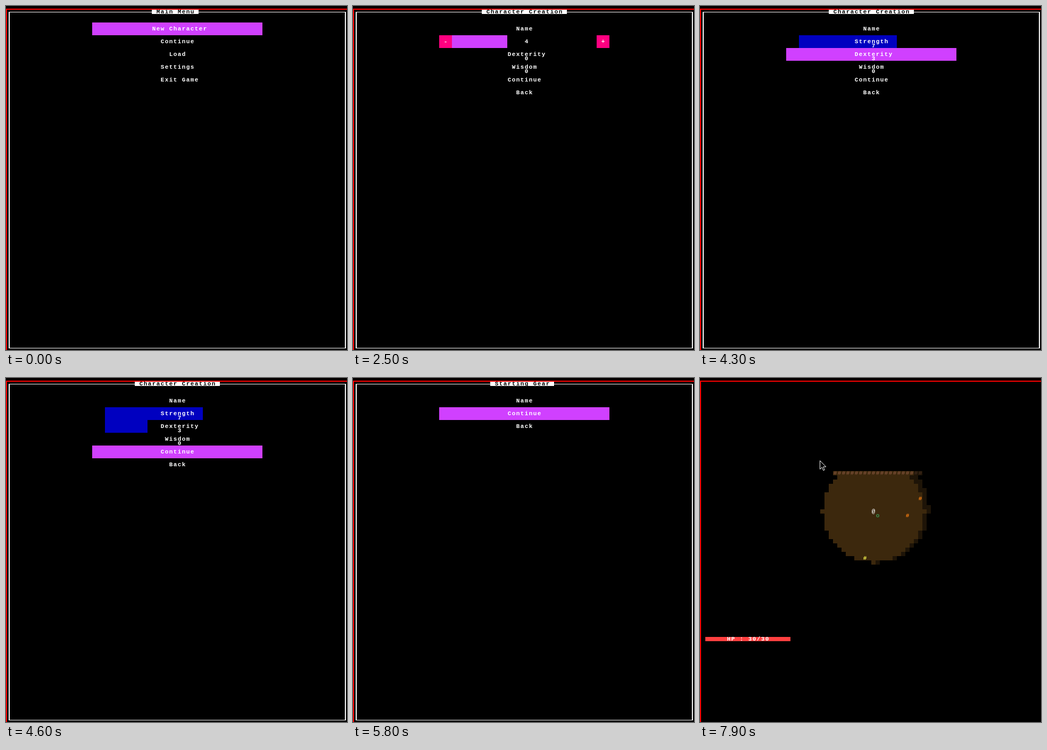
Animation, 641 px wide and 647 px high, one loop 8 s. Source, as an HTML page:

```html
<!DOCTYPE html>
<html lang="en">
<head>
<meta charset="utf-8">
<title>Roguelike menu</title>
<style>
  html, body { margin: 0; width: 100%; height: 100%; overflow: hidden; background: #000; }
  svg { display: block; width: 641px; height: 647px; }
  rect { shape-rendering: crispEdges; }
  text { font: bold 11px "Liberation Mono", "DejaVu Sans Mono", monospace; letter-spacing: 1.4px; }
</style>
</head>
<body>
<svg id="stage" viewBox="0 0 641 647"></svg>
<script>
const LOOP = 8000, CELL = 8, LEFT = 2, TOP = 7;
const HOT = '#d040ff', PINK = '#ff0080', BLUE = '#0000c0', WHITE = '#fff';
const FLOOR = '#3c280d', FLOOR_DIM = '#1e1407', WALL = '#80523a', WALL_DIM = '#402a1d';
const YELLOW = '#ffff50', ORANGE = '#ff8010', GREEN = '#3c9050';

const box = (x, y, w, h, fill) =>
  `<rect x="${x}" y="${y}" width="${w}" height="${h}" fill="${fill}"/>`;
// Positions in console cells
const block = (c, r, w, h, fill) =>
  box(LEFT + c * CELL, TOP + r * CELL, w * CELL, h * CELL, fill);
const print = (c, r, str, fill = WHITE) =>
  `<text x="${LEFT + c * CELL + 0.7}" y="${TOP + r * CELL + 7}" fill="${fill}">${str}</text>`;

const edge = box(0, 5, 641, 2, '#f00') + box(0, 5, 2, 642, '#f00');
const frame = box(5, 11, 634, 1, WHITE) + box(5, 643, 634, 1, WHITE) +
  box(5, 11, 2, 633, WHITE) + box(637, 11, 2, 633, WHITE);

// Column where each label starts
const COL = {
  'New Character': 34, Continue: 36, Load: 38, Settings: 36, 'Exit Game': 36,
  Name: 38, Strength: 36, Dexterity: 36, Wisdom: 37, Back: 38
};
const MAIN = ['New Character', 'Continue', 'Load', 'Settings', 'Exit Game'];
const CREATE = ['Name', 'Strength', 'Dexterity', 'Wisdom', 'Continue', 'Back'];
const SHORT = ['Name', 'Continue', 'Back'];

function slider(row, value, editing, hot) {
  const bar = fill => block(23, row, Math.floor(value * 3.4), 3, fill);
  if (!editing) return hot ? '' : bar(BLUE);
  return bar(HOT) + block(20, row, 3, 3, PINK) + block(57, row, 3, 3, PINK) +
    print(21, row + 1, '-') + print(58, row + 1, '+') + print(40, row + 1, value);
}

function menu(title, items, sel, stats = {}, editing = false) {
  const width = title.length + 2, start = 40 - Math.ceil(width / 2);
  let back = '', front = '';
  items.forEach((name, i) => {
    const row = 3 + i * 3, hot = i === sel, edit = hot && editing;
    if (hot && !edit) back += block(20, row, 40, 3, HOT);
    if (name in stats) {
      back += slider(row, stats[name], edit, hot);
      if (!edit) front += print(40, row + 2, stats[name]);
    }
    if (!edit) front += print(COL[name], row + 1, name);
  });
  return frame + block(start, 0, width, 1, WHITE) + print(start + 1, 0, title, '#000') + back + front;
}

const create = (sel, str, dex, editing) =>
  menu('Character Creation', CREATE, sel, { Strength: str, Dexterity: dex, Wisdom: 0 }, editing);

const SIGHT = 12, WALL_ROW = 22;
const PATH = [[40, 30], [40, 31], [39, 31]];
const CHASER = [[42, 33], [41, 32], [40, 32]];
const THINGS = [[50, 24, YELLOW], [37, 42, YELLOW], [50, 28, ORANGE], [47, 32, ORANGE]];
const reach = dy => Math.floor(Math.sqrt(SIGHT * SIGHT - dy * dy));

// Field of view around one spot, seen by a camera centred on another
function view([x, y], [cx, cy], floor, wall) {
  const dx = 40 - cx, dy = 30 - cy;
  let out = '';
  for (let d = -SIGHT; d <= SIGHT; d++) {
    const row = y + d;
    if (row < WALL_ROW) continue;
    const isWall = row === WALL_ROW;
    const r = isWall ? reach(d + 1) + 1 : reach(d);
    out += block(x - r + dx, row + dy, 2 * r + 1, 1, floor);
    if (isWall) out += print(x - r + dx, row + dy, '#'.repeat(2 * r + 1), wall);
  }
  return out;
}

function dungeon(turn) {
  const me = PATH[turn];
  const put = ([x, y], ch, fill) => print(x - me[0] + 40, y - me[1] + 30, ch, fill);
  const seen = ([x, y]) => Math.hypot(x - me[0], y - me[1]) <= SIGHT;
  return PATH.slice(0, turn).map(p => view(p, me, FLOOR_DIM, WALL_DIM)).join('') +
    view(me, me, FLOOR, WALL) +
    THINGS.filter(seen).map(t => put(t, '#', t[2])).join('') +
    put(CHASER[turn], 'o', GREEN) + put(me, '@', WHITE) +
    block(1, 60, 20, 1, '#ff4040') + print(6, 60, 'HP : 30/30');
}

const pointer = (x, y) => `<path transform="translate(${x} ${y})" fill="#000" stroke="#fff"
  d="M.5 .5V16.5L4.3 13L6.8 18.8L9.2 17.8L6.7 12H11.8Z"/>`;

const STEPS = [
  [0, menu('Main Menu', MAIN, 0)],
  [800, create(0, 0, 0)],
  [1600, create(1, 0, 0)],
  [2100, create(1, 0, 0, true)],
  [2300, create(1, 1, 0, true)],
  [2500, create(1, 4, 0, true)],
  [2600, create(1, 6, 0, true)],
  [2800, create(1, 7, 0, true)],
  [3100, create(1, 7, 0)],
  [3200, create(2, 7, 0)],
  [3500, create(2, 7, 0, true)],
  [3700, create(2, 7, 1, true)],
  [3900, create(2, 7, 2, true)],
  [4100, create(2, 7, 3, true)],
  [4300, create(2, 7, 3)],
  [4400, create(3, 7, 3)],
  [4600, create(4, 7, 3)],
  [5000, menu('Special Traits', SHORT, 0)],
  [5300, menu('Special Traits', SHORT, 1)],
  [5500, menu('Starting Gear', SHORT, 0)],
  [5800, menu('Starting Gear', SHORT, 1)],
  [6000, ''],
  [6100, dungeon(0)],
  [7200, dungeon(1)],
  [7600, dungeon(2)],
  [7700, dungeon(2) + pointer(89, 117)],
  [7800, dungeon(2) + pointer(165, 140)],
  [7900, dungeon(2) + pointer(225, 155)]
];

const stage = document.getElementById('stage');
const begin = performance.now();
let shown = -1;

function tick() {
  const t = (performance.now() - begin) % LOOP;
  const next = STEPS.findLastIndex(([at]) => at <= t);
  if (next !== shown) {
    shown = next;
    stage.innerHTML = edge + STEPS[next][1];
  }
  requestAnimationFrame(tick);
}
tick();
</script>
</body>
</html>
```
